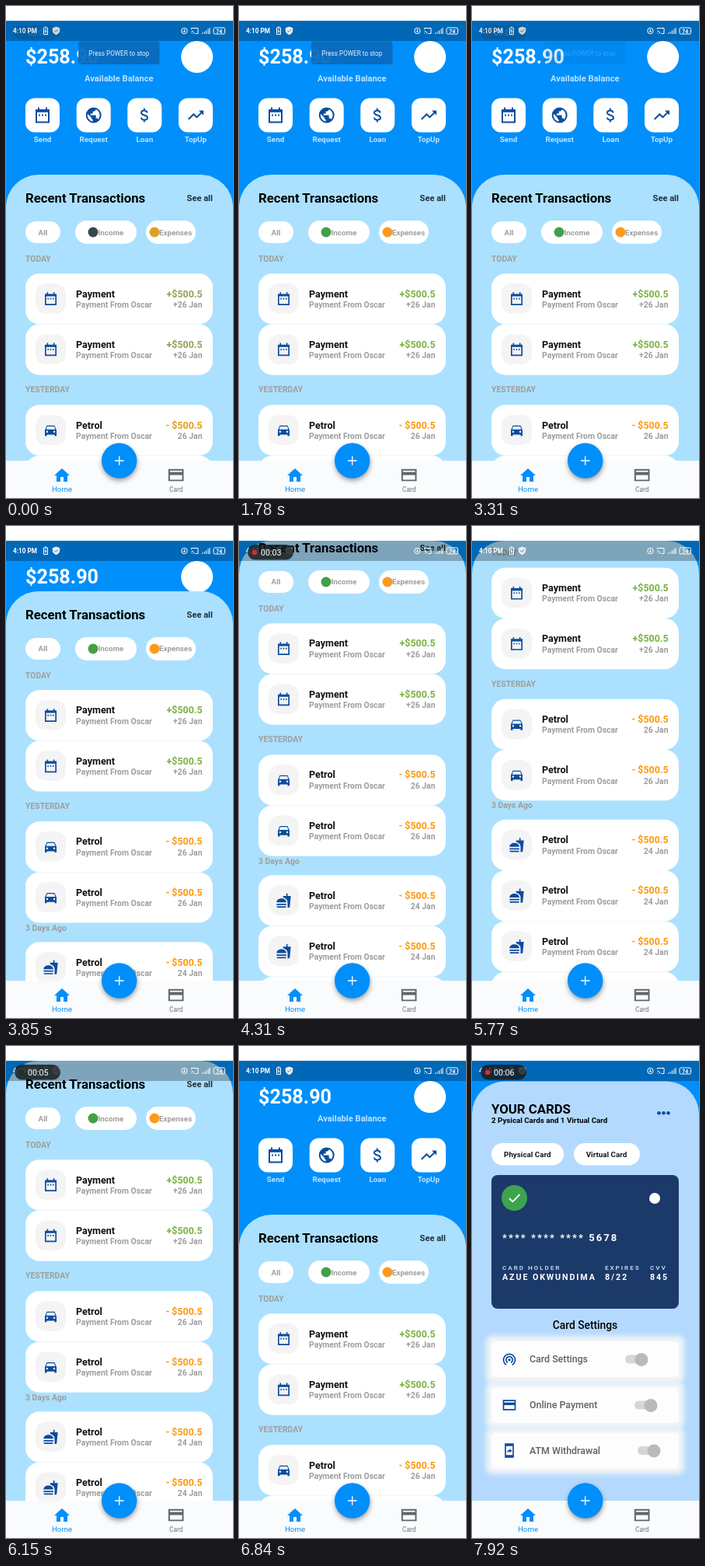
An HTML page that plays this animation: 292x633 px, repeating every 8 s.

```html
<!DOCTYPE html>
<html lang="en">
<head>
<meta charset="utf-8">
<title>Wallet app</title>
<style>
  html, body { margin: 0; width: 100%; height: 100%; overflow: hidden; background: #fff; }
  svg { display: block; width: 100vw; height: 100vh; --income: #7cb342; --expense: #fb9a13; --dot-in: #43a047; --dot-out: #fb9a1c; }
  svg.dull { --income: #90a555; --expense: #dda01e; --dot-in: #37474f; --dot-out: #dca028; }
  text { font-family: Roboto, sans-serif; white-space: pre; }
  .line { fill: none; stroke: currentColor; stroke-width: 2; }
  .glow { filter: blur(3px); }
</style>
</head>
<body>
<svg id="stage" viewBox="0 0 292 633"></svg>
<script>
const LOOP = 8000, CARDS_AT = 7600, SHEET_REST = 217, SHEET_TOP = 19;
const BLUE = '#008ffb', NAVY = '#0b4c9f', GREY = '#9e9e9e', PALE = '#bfe2ff';

const text = (x, y, size, str, fill = '#111', { w = 700, a = 'start', ls = 0, id = '' } = {}) =>
  `<text ${id && `id="${id}"`} x="${x}" y="${y}" font-size="${size}" font-weight="${w}" fill="${fill}" text-anchor="${a}" letter-spacing="${ls}">${str}</text>`;
const rect = (x, y, w, h, r, fill, extra = '') =>
  `<rect x="${x}" y="${y}" width="${w}" height="${h}" rx="${r}" fill="${fill}" ${extra}/>`;
const circle = (x, y, r, fill, extra = '') => `<circle cx="${x}" cy="${y}" r="${r}" fill="${fill}" ${extra}/>`;
const fillPath = d => `<path fill-rule="evenodd" d="${d}"/>`;
const linePath = d => `<path class="line" d="${d}"/>`;
const mid = { a: 'middle' }, end = { a: 'end' };

// Icons on a 24-unit grid
const icons = {
  calendar: linePath('M4 5.5h16V21H4zM4 7.3h16M7 2v4M17 2v4') + fillPath('M7 11h2v2H7zm4 0h2v2h-2zm4 0h2v2h-2z'),
  globe: fillPath('M12 2a10 10 0 1 0 0 20 10 10 0 0 0 0-20zM11 19.9C6 19 3.4 14.5 4.2 10.2L9 15v1l2 2zM17.9 17.4C17.5 16.5 17 16 16 16h-1v-4H8v-2h3V7h2l2-2v-.4c5 2 6.5 9 2.9 12.8z'),
  dollar: linePath('M15.2 9c-.1-2-1.3-3.1-3.7-3.1-2.300 0-3.800 1.100-3.800 2.900 0 4.300 8 2.200 8 6.500 0 1.800-1.500 2.800-3.900 2.800-2.500 0-4-1.100-4.100-3.100M11.500 3v3M11.500 18v3'),
  trend: linePath('M2.700 17.300l6.700-6.600 4 4 6.500-6.500') + fillPath('M16 6h6v6z'),
  car: fillPath('M6 5h12l3 7v9h-3v-2H6v2H3v-9zM6.500 6.500L5 11h14l-1.500-4.500zM5 14.500a1.500 1.500 0 1 0 3 0 1.500 1.500 0 1 0-3 0zM16 14.500a1.500 1.500 0 1 0 3 0 1.500 1.500 0 1 0-3 0z'),
  food: fillPath('M16 1h2v4h5l-1.700 17-1.300 1h-2v-8c0-4-3-6.500-6.700-7.600L11 5h5zM1 15c0-8 15-8 15 0zM1 17h15v2H1zM1 21h15l-1 2H2z'),
  home: fillPath('M10 20v-6h4v6h5v-8h3L12 3 2 12h3v8z'),
  card: linePath('M3 5h18v14H3z') + fillPath('M3 8h18v4H3z'),
  waves: `<circle cx="12" cy="13" r="2"/>` + linePath('M9.500 17.300a5 5 0 1 1 5 0M7.500 20.800a9 9 0 1 1 9 0'),
  phone: linePath('M6 2h12v20H6z') + fillPath('M6 2h12v3H6zM6 19h12v3H6zM8 15c.5-3 2-4 4.500-4V9l3.500 3.200-3.500 3.300v-2c-2 0-3.300.4-4.500 1.500z')
};
const icon = (name, cx, cy, size, color = NAVY) =>
  `<g transform="translate(${cx - size / 2} ${cy - size / 2}) scale(${size / 24})" color="${color}" fill="${color}">${icons[name]}</g>`;

const action = (cx, name, label) => rect(cx - 22, 118.5, 44, 44, 12, '#fff') + icon(name, cx, 140.5, 24) + text(cx, 175, 9.9, label, PALE, mid);

const entry = (y, name, title, amount, date, color) =>
  rect(25, y, 241, 65.2, 18, '#fff') + rect(38, y + 13, 39, 38.5, 13, '#f4f4f4') + icon(name, 57.5, y + 32.5, 20) +
  text(90, y + 30.3, 12.6, title) + text(90, y + 43.7, 10.4, 'Payment From Oscar', GREY) +
  text(252.5, y + 30.3, 12.4, amount, `var(--${color})`, end) + text(252.5, y + 43.7, 10.4, date, GREY, end);
const payment = y => entry(y, 'calendar', 'Payment', '+$500.5', '+26 Jan', 'income');
const petrol = (y, name, date) => entry(y, name, 'Petrol', '- $500.5', date, 'expense');
const PITCH = 65.25;

const list = text(25, 252.7, 16.75, 'Recent Transactions', '#000') + text(266, 251, 11.1, 'See all', '#22313c', end) +
  rect(25, 277, 45, 28, 14, '#fff') + text(47.5, 294.5, 9.8, 'All', GREY, mid) +
  rect(89, 276, 79, 30, 15, '#fff') + text(118.500, 294.5, 9.8, 'Income', GREY) + circle(112, 291, 6.5, 'var(--dot-in)') +
  rect(180, 276, 64, 30, 15, '#fff') + text(197, 294.5, 9.8, 'Expenses', GREY) + circle(191, 291, 6.5, 'var(--dot-out)') +
  text(25, 328.7, 10.4, 'TODAY', GREY) + payment(344.2) + payment(344.2 + PITCH) +
  text(25, 497.2, 10.4, 'YESTERDAY', GREY) + petrol(513.2, 'car', '26 Jan') + petrol(513.2 + PITCH, 'car', '26 Jan') +
  text(25, 653.7, 10.4, '3 Days Ago', GREY) +
  [0, 1, 2, 3, 4].map(i => petrol(668.3 + i * PITCH, 'food', '24 Jan')).join('');

const homePage = `<g id="home">` + text(25, 74, 25.2, '$258.90', '#fff') + circle(245.7, 65.5, 20.5, '#fff') +
  text(145.3, 96.7, 11.1, 'Available Balance', PALE, mid) +
  action(47, 'calendar', 'Send') + action(112.7, 'globe', 'Request') + action(178.3, 'dollar', 'Loan') + action(244, 'trend', 'TopUp') +
  `<g id="sheet" clip-path="url(#round)">` + rect(0, 0, 292, 700, 0, '#abe1ff') +
  `<g id="list">${list}</g></g></g>`;

const setting = (y, name, label, knob) => rect(25, y, 241, 46, 6, '#fdfdfd') + icon(name, 48, y + 23, 20) +
  text(74, y + 27.2, 12.4, label, '#616161', { w: 500 }) +
  rect(knob - 21, y + 17.500, 28, 11, 5.5, '#d6d6d6') + circle(knob, y + 23.5, 8.500, '#bababa');
const glow = y => rect(18, y - 7, 255, 60, 8, '#f2f4f6', 'class="glow"');
const label = (x, y, str) => text(x, y, 8.1, str, '#b5d3f0', { ls: 1.95 });
const value = (x, y, str) => text(x, y, 10.7, str, '#fff', { ls: 1.9 });

const cardsPage = `<g id="cards">` + rect(0, 45.5, 292, 700, 42, '#b3dafe') +
  text(25, 86.5, 16.8, 'YOUR CARDS', '#000') + text(25, 99.3, 9.75, '2 Pysical Cards and 1 Virtual Card', '#000') +
  [240.5, 246.5, 252.5].map(x => circle(x, 86.3, 2.3, NAVY)).join('') +
  rect(25, 125, 93, 28.5, 14.2, '#fff') + text(71.3, 142.7, 9.8, 'Physical Card', '#1a1a1a', mid) +
  rect(131, 125, 85, 28.5, 14.2, '#fff') + text(173, 142.7, 9.8, 'Virtual Card', '#1a1a1a', mid) +
  rect(25, 166, 241, 172, 8, '#1c3a69') + circle(54.5, 195.5, 16.5, '#3fa34d') +
  `<path d="M48 196l4.300 4.300 9-9.300" fill="none" stroke="#fff" stroke-width="1.800"/>` +
  circle(235, 196, 7, '#fff') +
  text(39, 251, 13, '**** **** **** 5678', '#fff', { ls: 2.05 }) +
  label(39, 288, 'CARD HOLDER') + label(171, 288, 'EXPIRES') + label(229, 288, 'CVV') +
  value(39, 300.700, 'AZUE OKWUNDIMA') + value(171, 300.700, '8/22') + value(229, 300.700, '845') +
  text(145.5, 363.700, 13.8, 'Card Settings', '#000', { ...mid, w: 500 }) +
  [380, 439, 497.500].map(glow).join('') +
  setting(380, 'waves', 'Card Settings', 218) + setting(439, 'card', 'Online Payment', 230) + setting(497.500, 'phone', 'ATM Withdrawal', 234) + `</g>`;

const nav = rect(0, 585, 292, 48, 0, '#fafbfc') + icon('home', 72, 604, 24, BLUE) + text(72, 624.6, 9.7, 'Home', BLUE, { ...mid, w: 400 }) +
  icon('card', 218.700, 603.500, 23.500, '#5f666c') + text(218.700, 624.6, 8.4, 'Card', '#6d7276', { ...mid, w: 400 }) +
  circle(146, 588, 22.500, 'rgba(0,0,0,.4)', 'class="glow"') + circle(145.700, 585, 22.700, BLUE) +
  `<path d="M140 585h11.500M145.700 579.300v11.500" stroke="#fff" stroke-width="1.300"/>`;

const white = d => `<path d="${d}" fill="none" stroke="#fff" stroke-width="1"/>`;
const statusBar = rect(0, 19, 292, 26, 0, 'rgba(0,0,0,.27)') + text(9, 35, 8.2, '4:10 PM', '#fff') +
  white('M48.500 28h5v8.500h-5zM50 27h2M51.500 29.500l-1.500 3h2l-1.500 2.500') +
  `<path d="M64.500 26.500l4.700 1.700v3.300q0 3.700-4.700 5.700-4.700-2-4.700-5.700v-3.300z" fill="#e8edf2"/><path d="M62.300 31.700l1.700 1.700 3-3.200" fill="none" stroke="#56738c"/>` +
  white('M225.700 32a3.700 3.700 0 1 0 7.400 0 3.700 3.700 0 1 0-7.400 0M229.400 29.800v4M227.900 32.300l1.500 1.500 1.500-1.500') +
  white('M238.500 30v-1.500h8.500v7h-3.500M238.500 32q3 .5 3.500 3.500M238.500 34.500l1 1') +
  white('M252.500 36v-1.500M255 36v-3M257.500 36v-4.500M260 36v-6.500M262 36v-8') +
  white('M268.500 28h11.500q1.500 0 1.500 1.500v5q0 1.500-1.500 1.500h-11.500q-1.500 0-1.500-1.500v-5q0-1.500 1.500-1.500z') + text(274.300, 34.700, 7, '74', '#fff', mid);

const overlays = `<g id="toast">` + rect(93, 45.500, 104.500, 29.500, 3, '#0a6bbd', 'fill-opacity=".94"') +
  text(145.300, 63.500, 8.2, 'Press POWER to stop', '#e6f1fb', { ...mid, w: 400 }) + `</g>` +
  `<g id="pill">` + rect(11, 24, 59, 19.500, 9.700, '#15191d', 'fill-opacity=".82"') + circle(20, 34, 3.200, '#d32f2f', 'id="rec"') +
  text(28, 37.700, 10.6, '00:00', '#fff', { w: 400, id: 'clock' }) + `</g>`;

const stage = document.getElementById('stage');
stage.innerHTML = `<defs><clipPath id="round">${rect(0, 0, 292, 700, 42, '#000')}</clipPath></defs>` +
  rect(0, 0, 292, 633, 0, BLUE) + homePage + cardsPage + nav + statusBar + rect(0, 0, 292, 19, 0, '#fff') + overlays;
const $ = id => document.getElementById(id);

// [time, value] steps, eased between neighbours
const scrollKeys = [[3450, 0], [4100, 198], [4230, 198], [4310, 219], [4850, 409.5], [5500, 409.5], [6000, 198], [6200, 198], [6720, 0]];
const toastKeys = [[3080, 1], [3350, .06], [3400, 0]];
const pillKeys = [[0, .12], [1460, .12], [1620, 0], [2150, 0], [2350, 1], [3080, 1], [3320, .12], [3420, 0], [4000, 0], [4200, 1],
  [4750, 1], [4950, 0], [5850, 0], [6050, 1], [6550, 1], [6780, 0], [7600, 0], [7800, 1]];
const smooth = p => p * p * (3 - 2 * p);
function at(keys, t, ease = p => p) {
  const i = keys.findIndex(k => k[0] > t);
  if (i === 0) return keys[0][1];
  if (i < 0) return keys[keys.length - 1][1];
  const [t0, a] = keys[i - 1], [t1, b] = keys[i];
  return a + (b - a) * ease((t - t0) / (t1 - t0));
}

function draw(t) {
  const scroll = at(scrollKeys, t, smooth);
  const top = Math.max(SHEET_TOP, SHEET_REST - scroll);
  const inner = Math.max(0, scroll - (SHEET_REST - SHEET_TOP));
  $('sheet').setAttribute('transform', `translate(0 ${top})`);
  $('list').setAttribute('transform', `translate(0 ${-SHEET_REST - inner})`);
  $('home').style.display = t < CARDS_AT ? '' : 'none';
  $('cards').style.display = t < CARDS_AT ? 'none' : '';
  stage.classList.toggle('dull', t < 1460);
  $('toast').style.opacity = at(toastKeys, t);
  $('pill').style.opacity = at(pillKeys, t);
  $('rec').style.fill = t % 1000 < 250 ? '#16351f' : '';
  $('clock').textContent = '00:0' + Math.max(0, Math.floor((t - 1100) / 1000));
}

const start = performance.now();
function tick() {
  draw((performance.now() - start) % LOOP);
  requestAnimationFrame(tick);
}
tick();
</script>
</body>
</html>
```
